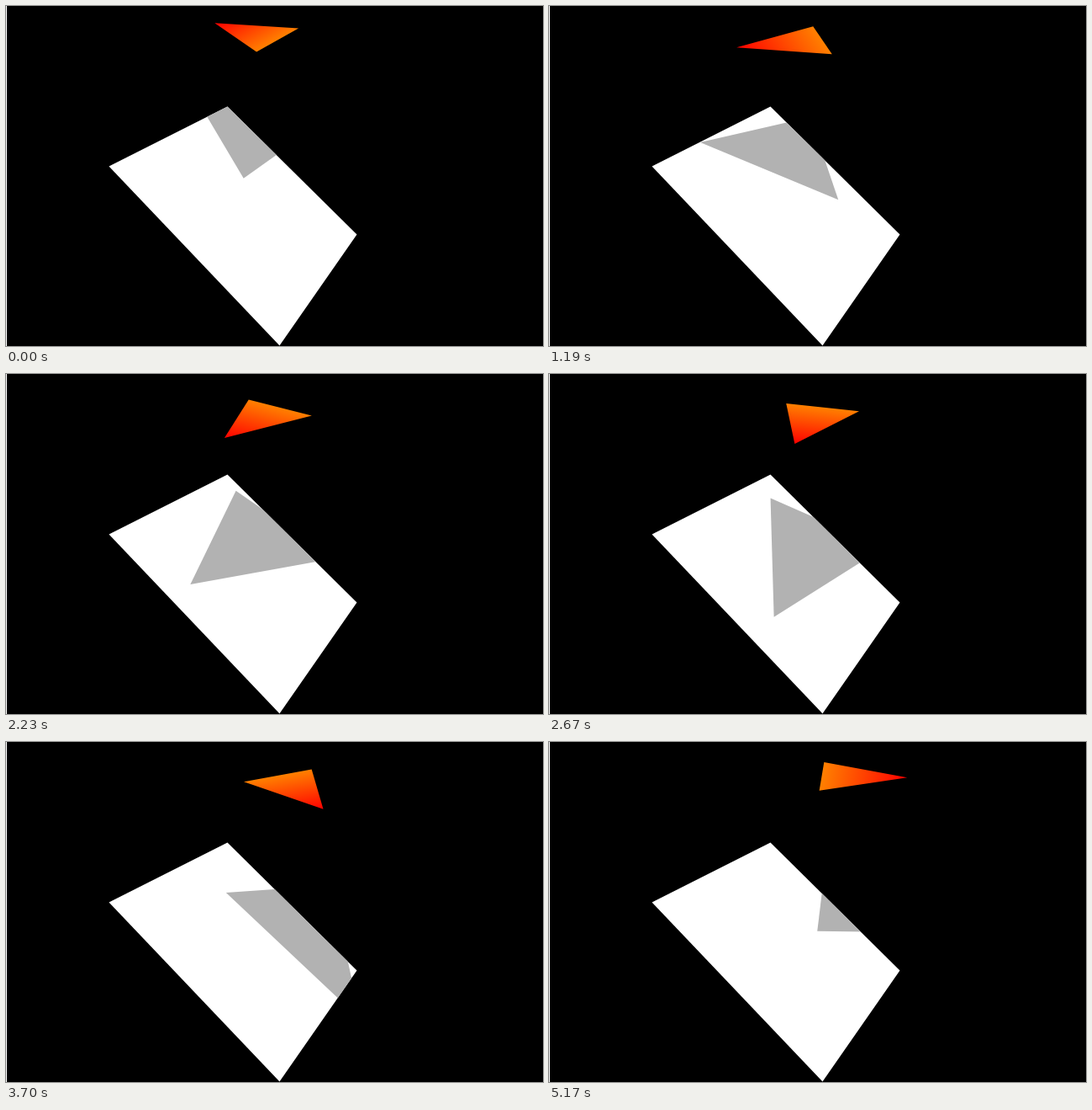
Animation, 639 px wide and 404 px high, one loop 5270 ms. Source, as an HTML page with a canvas:

```html
<!DOCTYPE html>
<html lang="en">
<head>
<meta charset="utf-8">
<title>Turning triangle with shadow</title>
<style>
  html, body { margin: 0; width: 100%; height: 100%; overflow: hidden; background: #000; }
  canvas { display: block; }
</style>
</head>
<body>
<canvas id="stage" width="639" height="404"></canvas>
<script>
const ctx = document.getElementById('stage').getContext('2d');

// Timing: 36 poses, mostly 150 ms each, some slightly shorter.
const POSES = 36;
const SHORT = new Set([4, 10, 16, 19, 21, 26, 30, 32]);
const LOOP = 5270;
const starts = [0];
for (let i = 1; i < POSES; i++) {
  starts.push(starts[i - 1] + (SHORT.has(i - 1) ? 140 : 150));
}

const STEP = 6;
const FIRST_ANGLE = 146;
const LONG_RADIUS = 100.5;
const SIDE_RADIUS = 45;
const FLOOR = [[122, 190], [263, 119], [417, 271], [325, 403]];

// Point on the horizontal turning plane.
function polar(radius, degrees) {
  const a = degrees * Math.PI / 180;
  return [radius * Math.cos(a), radius * Math.sin(a)];
}

// Perspective view of the turning plane.
function project([x, z]) {
  const w = 1 + 0.0017 * z;
  return [320 + (x + 4.2) / w, 39.1 - 0.376 * z / w];
}

// Shadow cast from the turning plane onto the floor, in perspective.
function cast([x, z]) {
  const w = 1 - 0.001104 * x + 0.002792 * z;
  return [
    (1.19 * x + 0.9173 * z + 324.83) / w,
    (0.194 * x - 0.5252 * z + 174.02) / w
  ];
}

function trace(points) {
  ctx.beginPath();
  points.forEach(([x, y]) => ctx.lineTo(x, y));
  ctx.closePath();
}

// Gradient from the tip, square to the opposite edge.
function shade([tip, b, c]) {
  const dx = c[0] - b[0], dy = c[1] - b[1];
  const t = ((tip[0] - b[0]) * dx + (tip[1] - b[1]) * dy) / (dx * dx + dy * dy);
  const g = ctx.createLinearGradient(tip[0], tip[1], b[0] + t * dx, b[1] + t * dy);
  g.addColorStop(0, '#ff0000');
  g.addColorStop(1, '#ff8000');
  return g;
}

function draw(pose) {
  const angle = FIRST_ANGLE + STEP * pose;
  const corners = [
    polar(LONG_RADIUS, angle),
    polar(SIDE_RADIUS, angle - 90),
    polar(SIDE_RADIUS, angle + 90)
  ];

  ctx.fillStyle = '#000';
  ctx.fillRect(0, 0, 639, 404);
  ctx.fillStyle = '#fff';
  ctx.fillRect(0, 0, 1, 404);

  ctx.save();
  ctx.translate(0.5, 0.5);

  ctx.save();
  trace(FLOOR);
  ctx.fill();
  ctx.clip();
  ctx.fillStyle = '#b2b2b2';
  trace(corners.map(cast));
  ctx.fill();
  ctx.restore();

  const face = corners.map(project);
  ctx.fillStyle = shade(face);
  trace(face);
  ctx.fill();
  ctx.restore();
}

const origin = performance.now();
function tick() {
  const t = Math.max(0, performance.now() - origin) % LOOP;
  let pose = POSES - 1;
  while (starts[pose] > t) pose--;
  draw(pose);
  requestAnimationFrame(tick);
}
tick();
</script>
</body>
</html>
```
